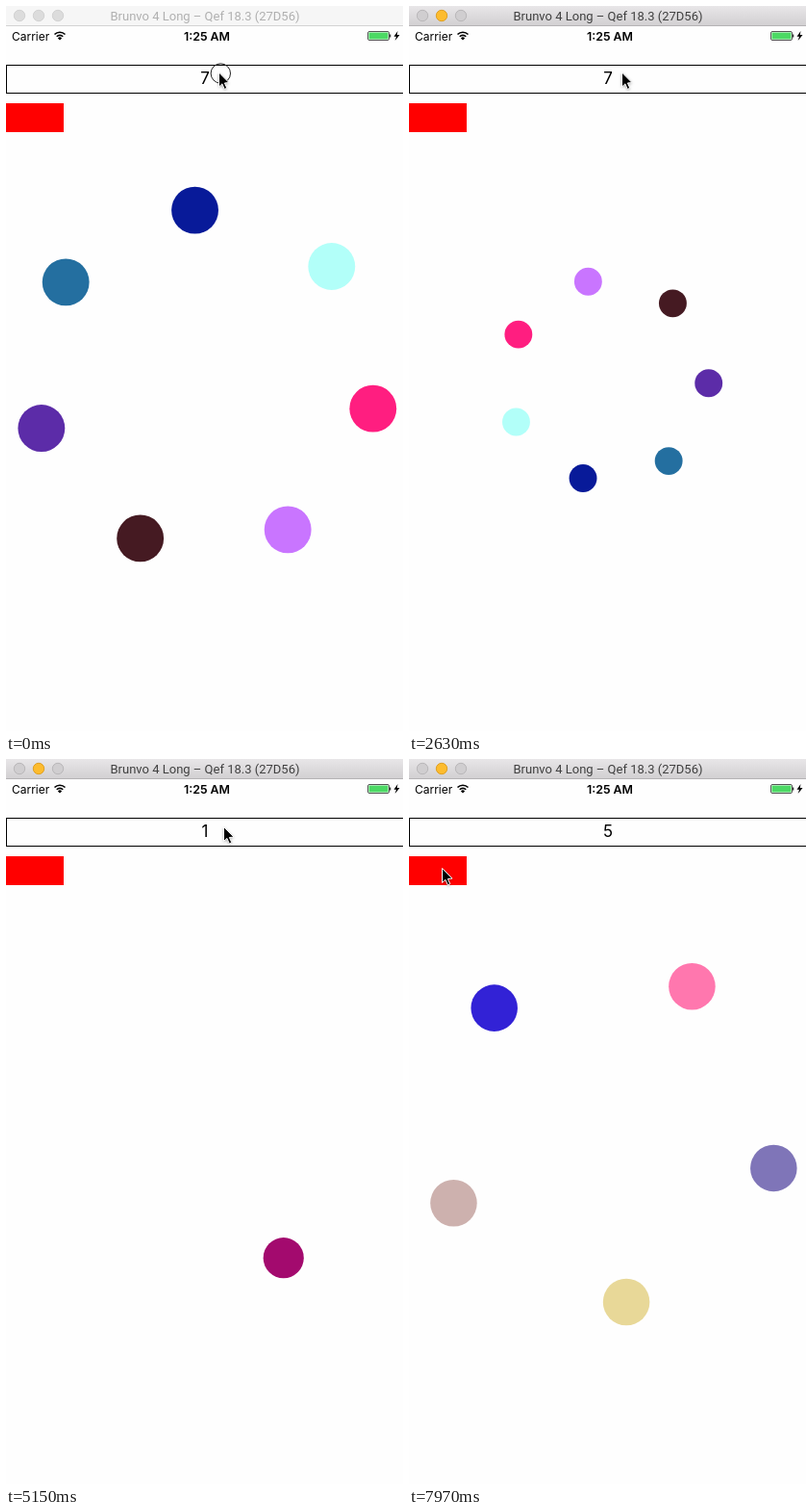
These frames come from a looping animation (413 by 753 pixels, 8 s). An HTML page with a canvas:

```html
<!DOCTYPE html>
<html lang="en">
<head>
<meta charset="utf-8">
<title>Spinning dots</title>
<style>
html, body { margin: 0; width: 100%; height: 100%; overflow: hidden; background: #fefefe; }
canvas { display: block; width: 413px; height: 753px; }
</style>
</head>
<body>
<canvas id="stage" width="413" height="753"></canvas>
<script>
const ctx = document.getElementById('stage').getContext('2d');
const LOOP = 8000, TAU = Math.PI * 2;
const UI = 'Inter, "Open Sans", sans-serif';
const CENTER = { x: 207, y: 389 }, ORBIT = 182, DOT = 25.1;

// Each ring: start time, [ms, degrees] steps, dot colours
const rings = [
  { start: 0, turn: [[0, 9.4], [600, 56.1], [1780, 144.2], [3390, 263.4], [4080, 312.5], [4350, 330]],
    colors: ['#ff1e80', '#c975ff', '#451a22', '#5c2ca8', '#246fa0', '#081a99', '#b2fff9'] },
  { start: 4350, turn: [[4350, 0], [5150, 57.6], [6710, 176.6], [7815, 259.5]],
    colors: ['#a30a6e'] },
  { start: 7815, turn: [[7815, 0], [7970, 11.7], [8000, 14]],
    colors: ['#7f75b8', '#e8d898', '#cdb1ae', '#3222d6', '#ff77ae'] }
];

const fieldStates = [
  { start: 0, text: '7', editing: true },
  { start: 2700, text: '', editing: true },
  { start: 3100, text: '1', editing: true },
  { start: 4350, text: '1', editing: false },
  { start: 5700, text: '1', editing: true },
  { start: 6600, text: '', editing: true },
  { start: 7300, text: '5', editing: true },
  { start: 7815, text: '5', editing: false }
];

// [ms, x, y] of the pointer tip
const pointerPath = [
  [0, 221.5, 69], [4060, 221.5, 69], [4290, 34.5, 113], [4800, 34.5, 113], [4920, 62, 104],
  [5050, 180, 27], [5140, 226.5, 70.5], [5800, 226.5, 70.5], [6050, 248.5, 72.5],
  [7430, 248.5, 72.5], [7720, 34.5, 113.5], [8000, 34.5, 113.5]
];
const menuFade = [[0, 0], [6150, 0], [6250, 1], [6600, 1], [6743, 0], [8000, 0]];
const blink = [[0, 1], [400, 1], [520, 0], [800, 0], [900, 1], [1000, 1]];

const current = (list, t) => list.filter(item => item.start <= t).pop();

function at(steps, t, col = 1) {
  const i = steps.findIndex(step => step[0] > t);
  if (i < 0) return steps[steps.length - 1][col];
  if (i === 0) return steps[0][col];
  const a = steps[i - 1], b = steps[i];
  return a[col] + (b[col] - a[col]) * (t - a[0]) / (b[0] - a[0]);
}

function rect(x, y, w, h, fill) {
  ctx.fillStyle = fill;
  ctx.fillRect(x, y, w, h);
}

function circle(x, y, r, fill, stroke) {
  ctx.beginPath();
  ctx.arc(x, y, r, 0, TAU);
  if (fill) { ctx.fillStyle = fill; ctx.fill(); }
  if (stroke) { ctx.strokeStyle = stroke; ctx.lineWidth = 1; ctx.stroke(); }
}

function polygon(points) {
  ctx.beginPath();
  points.forEach(([x, y]) => ctx.lineTo(x, y));
  ctx.closePath();
}

function label(text, x, y, font, fill, align = 'center') {
  ctx.font = font;
  ctx.fillStyle = fill;
  ctx.textAlign = align;
  ctx.fillText(text, x, y);
}

function drawTitleBar(active) {
  let fill = '#f6f6f6';
  if (active) {
    fill = ctx.createLinearGradient(0, 0, 0, 20);
    fill.addColorStop(0, '#e8e6e8');
    fill.addColorStop(1, '#d2d0d2');
  }
  rect(0, 0, 413, 20, fill);
  rect(0, 20, 413, 1, active ? '#b5b3b5' : '#d3d3d3');
  [14, 34, 54].forEach((x, i) => {
    if (active && i === 1) circle(x, 10, 5.7, '#fdbc2e', '#dfa023');
    else circle(x, 10, 5.7, active ? '#d0ced0' : '#dcdcdc', active ? '#b9b7b9' : '#d2d2d2');
  });
  label('Brunvo 4 Long – Qef 18.3 (27D56)', 207, 15, '13px Roboto, sans-serif', active ? '#404040' : '#b0b0b0');
}

function drawStatusBar() {
  label('Carrier', 6, 36, '12px ' + UI, '#000', 'left');
  label('1:25 AM', 209, 36, '600 12.4px ' + UI, '#000');

  ctx.strokeStyle = '#000';
  ctx.lineWidth = 1.6;
  [4.6, 7.8].forEach(r => {
    ctx.beginPath();
    ctx.arc(56, 35, r, -Math.PI * 0.75, -Math.PI * 0.25);
    ctx.stroke();
  });
  ctx.beginPath();
  ctx.moveTo(56, 35.5);
  ctx.arc(56, 35.5, 3, -Math.PI * 0.75, -Math.PI * 0.25);
  ctx.fillStyle = '#000';
  ctx.fill();

  ctx.lineWidth = 1;
  ctx.strokeStyle = '#555';
  ctx.beginPath();
  ctx.roundRect(376.5, 26.5, 22, 9, 1.5);
  ctx.stroke();
  rect(377.5, 27.5, 20, 7, '#4cd964');
  rect(399, 29.5, 1.3, 3, '#333');
  polygon([[407.5, 26], [403.5, 31.7], [406, 31.7], [404.7, 36], [409.5, 30], [406.8, 30]]);
  ctx.fillStyle = '#000';
  ctx.fill();
}

function drawField(t) {
  const { start, text, editing } = current(fieldStates, t);
  ctx.strokeStyle = '#000';
  ctx.lineWidth = 1;
  ctx.strokeRect(0.5, 61.5, 413, 29);
  if (text) label(text, 207, 81, '17px ' + UI, '#000');
  else label('输入正整数', 207, 82, '17px "Noto Sans CJK SC", "Noto Sans CJK", sans-serif', '#c7c7cd');
  if (!editing) return;
  const lag = start === 0 ? 100 : 0;
  if (t < start + lag) return;
  ctx.globalAlpha = at(blink, (t - start - lag) % 1000);
  rect(text ? 210 : 162, 65, 2, 21, '#426bf2');
  ctx.globalAlpha = 1;
}

function drawRing(t) {
  const { turn, colors } = current(rings, t);
  const degrees = at(turn, t);
  // Full size at every whole turn, half size at every half turn
  const scale = 0.5 + Math.abs(180 - degrees % 360) / 360;
  colors.forEach((color, i) => {
    const angle = (degrees / 360 + i / colors.length) * TAU;
    circle(CENTER.x + Math.cos(angle) * ORBIT * scale,
           CENTER.y + Math.sin(angle) * ORBIT * scale, DOT * scale, color);
  });
}

function drawMenu(t) {
  const alpha = at(menuFade, t);
  if (!alpha) return;
  ctx.globalAlpha = alpha;
  ctx.fillStyle = '#141414';
  ctx.beginPath();
  ctx.roundRect(125, 101, 170, 36, 8);
  ctx.moveTo(201, 101);
  ctx.lineTo(210, 92);
  ctx.lineTo(219, 101);
  ctx.fill();
  label('Select', 163, 124, '14px ' + UI, '#fff');
  label('Select All', 248, 124, '14px ' + UI, '#fff');
  ctx.globalAlpha = 1;
}

function drawPointer(t) {
  const x = at(pointerPath, t, 1), y = at(pointerPath, t, 2);
  if (t < 150) circle(x + 1.8, y + 1, 10.2, null, '#222');
  ctx.save();
  ctx.translate(x, y);
  polygon([[0, 0], [0, 15], [3.4, 11.9], [5.8, 17.4], [8.3, 16.3], [5.9, 11], [10.5, 10.6]]);
  ctx.shadowColor = 'rgba(0,0,0,.4)';
  ctx.shadowBlur = 3;
  ctx.shadowOffsetY = 1;
  ctx.fillStyle = '#000';
  ctx.fill();
  ctx.shadowColor = 'transparent';
  ctx.strokeStyle = '#fff';
  ctx.lineWidth = 1;
  ctx.stroke();
  ctx.restore();
}

function draw(t) {
  rect(0, 0, 413, 753, '#fefefe');
  drawTitleBar(t >= 2050);
  drawStatusBar();
  drawField(t);
  rect(0, 101, 60, 30, '#f00');
  drawRing(t);
  drawMenu(t);
  drawPointer(t);
}

const began = performance.now();
function tick() {
  draw((performance.now() - began) % LOOP);
  requestAnimationFrame(tick);
}
tick();
</script>
</body>
</html>
```
